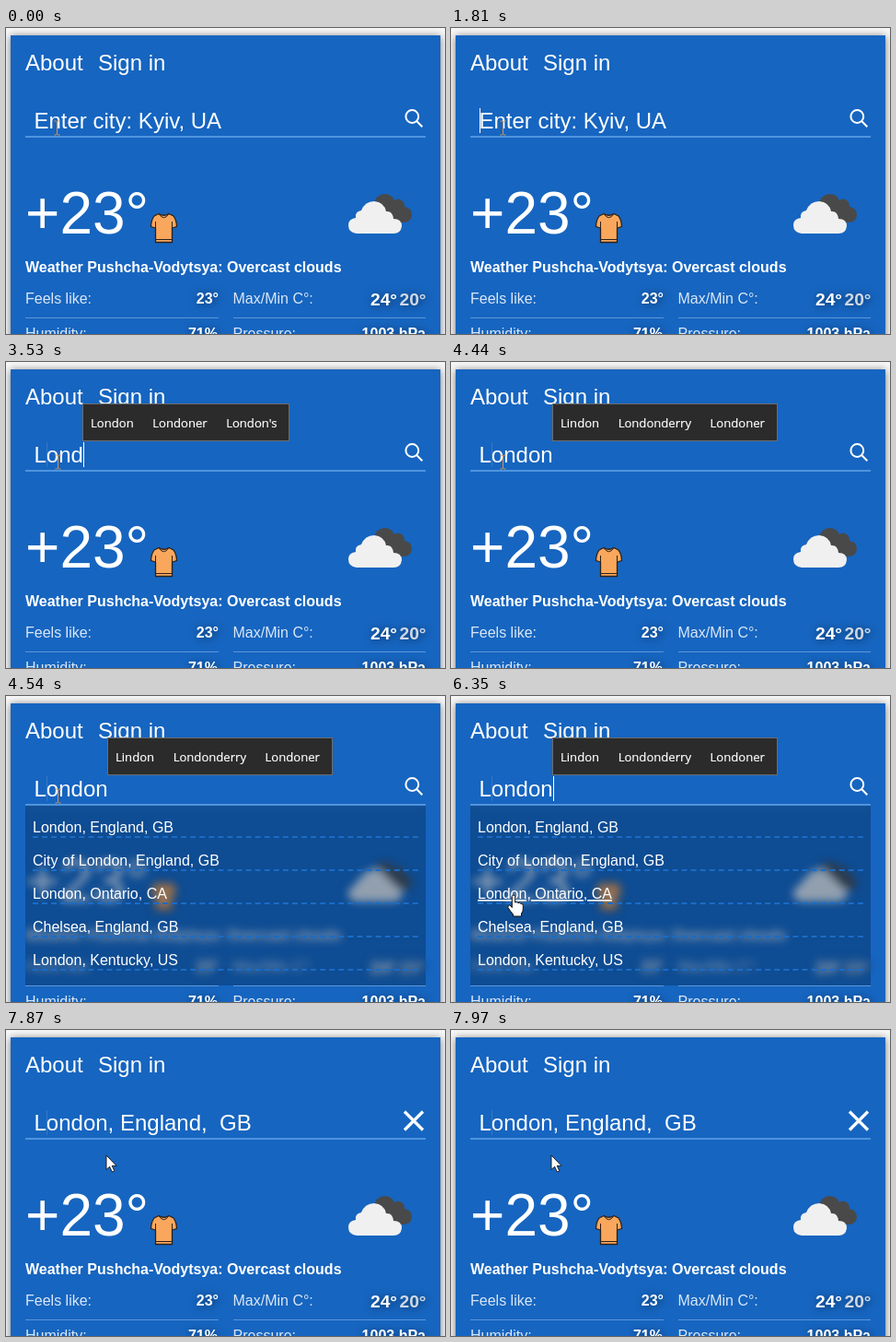
An HTML page for the animation above (8000 ms loop, 477 by 332 pixels).

```html
<!DOCTYPE html>
<html lang="en">
<head>
<meta charset="utf-8">
<title>Weather search</title>
<style>
  html, body { margin: 0; width: 100%; height: 100%; overflow: hidden; background: #f7f7f7; }
  svg { display: block; }
  text { font-family: "Liberation Sans", Arial, sans-serif; font-size: 16px; fill: #fff; white-space: pre; }
  .big { font-size: 24px; }
  .label { fill: #dbe7f5; }
  .value { font-weight: bold; text-anchor: end; filter: drop-shadow(1px 1px 4px rgba(0, 0, 0, .5)); }
  .range { font-size: 19.2px; }
  .popup text { font-family: "Open Sans", "Noto Sans", sans-serif; font-size: 13.1px; stroke: #fff; stroke-width: .2; }
  .hover { text-decoration: underline; }
</style>
</head>
<body>
<svg width="477" height="332" viewBox="0 0 477 332">
  <defs>
    <filter id="shadow" x="-5%" y="-5%" width="110%" height="110%">
      <feDropShadow dx="0" dy="1" stdDeviation="4" flood-color="#000" flood-opacity=".55"/>
    </filter>
    <filter id="blur"><feGaussianBlur stdDeviation="5"/></filter>
    <clipPath id="listArea"><rect x="21" y="119" width="435" height="195"/></clipPath>
  </defs>

  <rect x="5" y="8" width="467" height="360" fill="#1565c0" filter="url(#shadow)"/>
  <text class="big" x="21" y="46">About</text>
  <text class="big" x="100" y="46">Sign in</text>

  <g id="weather">
    <path d="M21 118 H456" stroke="#62a4e8" stroke-width="1.600"/>
    <text x="21" y="223" style="font-size:64px">+23°</text>
    <g stroke="#2c2018" stroke-width="1.300" stroke-linejoin="round" fill="#f9a75c">
      <path d="M166 201.500 L161 204 Q157.500 209 157.500 215.500 L162.500 217 V232.500 H180.500 V217 L185.500 215.500 Q185.500 209 182 204 L177 201.500 Q171.500 205 166 201.500Z"/>
      <path d="M166 201.500 Q171.500 210 177 201.500 M162.500 217 V210 M180.500 217 V210 M163 229.500 H180" fill="none" stroke-width="1"/>
    </g>
    <path fill="#494949" d="M400 209 V192 Q401 181 411 180 Q419 180 422 187 Q426 184 430 187 Q433 189 433 194 Q441 195 441 203 Q440 211 432 211 H402Z"/>
    <path fill="#f0f0f0" d="M381 223 Q372 222 372 214 Q372 207 380 206 Q379 199 386 198 Q390 188 400 188 Q411 189 413 199 Q420 198 421 207 Q430 207 430 215 Q429 223 421 223Z"/>
    <text x="21" y="265" font-weight="bold">Weather Pushcha-Vodytsya: Overcast clouds</text>
    <text class="label" x="21" y="299">Feels like:</text>
    <text class="value" x="231" y="299">23°</text>
    <text class="label" x="246.500" y="299">Max/Min C°:</text>
    <text class="value range" x="425" y="301">24°</text>
    <text class="value range" x="456.500" y="301" style="fill:#cfd8e4">20°</text>
  </g>

  <g id="list">
    <g clip-path="url(#listArea)">
      <rect x="21" y="119" width="435" height="195" fill="#1565c0"/>
      <use href="#weather" filter="url(#blur)"/>
      <rect x="21" y="119" width="435" height="195" fill="#04264e" fill-opacity=".4"/>
    </g>
  </g>

  <path d="M21 314.500 H231 M247 314.500 H456" stroke="#5c97d9"/>
  <text class="label" x="21" y="336.500">Humidity:</text>
  <text class="value" x="230" y="336.500">71%</text>
  <text class="label" x="246.500" y="336.500">Pressure:</text>
  <text class="value" x="456" y="336.500">1003 hPa</text>

  <text class="big" id="field" x="30.500" y="109"></text>
  <path id="trace" d="M44.500 87 V114" stroke="#4d86c8" stroke-opacity=".6"/>
  <path id="caret" d="M.5 87 V114" stroke="#fff"/>
  <g fill="none" stroke="#fff">
    <path id="lens" stroke-width="2" d="M448.200 96 a6.900 6.900 0 1 0 -13.800 0 a6.900 6.900 0 1 0 13.800 0 M446.200 101 L452.300 107.200"/>
    <path id="cross" stroke-width="3.200" d="M433 88.500 L453 108.500 M453 88.500 L433 108.500"/>
  </g>

  <g class="popup" id="popup">
    <rect x=".5" y="45.500" height="40" fill="#2b2b2b" stroke="#6c6c6c"/>
    <text x="9" y="71"></text>
  </g>

  <path id="beam" fill="none" stroke="#d09558" d="M-3 -7.500 H-1 L0 -6.500 L1 -7.500 H3 M0 -6.500 V6.500 M-3 7.500 H-1 L0 6.500 L1 7.500 H3"/>
  <path id="arrow" fill="#fff" stroke="#111" stroke-width=".9" d="M0 0 V15.500 L3.600 12.200 L6.300 18 L8.800 16.900 L6.200 11.300 H11Z"/>
  <path id="hand" fill="#fff" stroke="#111" stroke-linejoin="round" d="M-1.700 1.500 Q-1.500 0 0 0 Q1.500 0 1.700 1.500 V8 Q3.500 6.800 4.800 8.500 Q6.500 7.500 7.800 9.300 Q10.300 8.800 10.300 11.500 V15 Q10.300 18 8.500 20 V23 H-.5 V21 Q-4 17 -6 13.500 Q-6.500 11 -4.500 11 Q-3 11.300 -1.700 13.500Z"/>
</svg>

<script>
const LOOP = 8000;
const $ = id => document.getElementById(id);
const show = (el, on) => el.setAttribute("display", on ? "inline" : "none");
const move = (el, x, y) => el.setAttribute("transform", `translate(${x} ${y})`);

function add(parent, tag, attrs, text = "") {
  const el = document.createElementNS("http://www.w3.org/2000/svg", tag);
  for (const key in attrs) el.setAttribute(key, attrs[key]);
  el.textContent = text;
  return parent.appendChild(el);
}

// Value of the last [time, value] step already reached
const stepAt = (steps, t) => steps.reduce((value, [start, next]) => t >= start ? next : value, steps[0][1]);

const cities = ["London, England, GB", "City of London, England, GB", "London, Ontario, CA",
  "Chelsea, England, GB", "London, Kentucky, US"];
const rows = cities.map((city, i) => {
  const y = 148 + 36 * i;
  add($("list"), "path", { d: `M29 ${y + 5} H448`, stroke: "#1a6cc6", "stroke-width": 2, "stroke-dasharray": "6 4.07" });
  return add($("list"), "text", { x: 29, y }, city);
});

const typed = [[0, "Enter city: Kyiv, UA"], [2410, "L"], [2610, "Lo"], [2920, "Lon"], [3320, "Lond"],
  [3830, "Londo"], [4130, "London"], [7670, "London, England,  GB"]];
const hints = [[0, ""], [2710, "Looking|Looking for|Love"], [3020, "London|Longer|Longest"],
  [3420, "London|Londoner|London's"], [4130, "Lindon|Londonderry|Londoner"], [7670, ""]];
const hintX = [[0, 56], [3020, 70], [3420, 83], [3930, 97], [4130, 110]];
const caretX = [[0, 31], [2410, 44], [2610, 57], [2920, 70], [3320, 84], [3830, 97], [4130, 111]];
const caretOn = [[0, false], [800, true], [1300, false], [1810, true], [2310, false], [2410, true],
  [4440, false], [5050, true], [5550, false], [6050, true], [6550, false], [7060, true], [7570, false]];
const beamPos = [[0, [55.5, 108.5]], [690, [60.5, 111.5]], [800, [56.5, 108.5]]];

// Pointer positions, one every 100 ms
const pointerStart = 5750;
const pointerPath = [[57, 120], [57, 128], [58, 140], [60, 156], [63, 165], [66, 195], [68, 216], [68, 232],
  [68, 265], [69, 286], [71, 287], [76, 272], [88, 232], [99, 182], [108.5, 149], [109, 140], [109, 136]];

let shownHints = null;
function drawPopup(words, x) {
  const [box, label] = $("popup").children;
  show($("popup"), words);
  move($("popup"), x, 0);
  if (!words || words === shownHints) return;
  shownHints = words;
  label.textContent = "";
  words.split("|").forEach((word, i) => add(label, "tspan", { dx: i ? 20.5 : 0 }, word));
  box.setAttribute("width", Math.round(label.getBBox().width + 21.5));
}

function drawPointer(t, listOpen) {
  const pointing = t >= pointerStart;
  const index = Math.min(pointerPath.length - 1, Math.max(0, Math.floor((t - pointerStart) / 100)));
  const [x, y] = pointerPath[index];
  const row = Math.floor((y - 132) / 36);
  const over = pointing && listOpen && y - 132 - 36 * row < 20 ? row : -1;
  rows.forEach((el, i) => el.setAttribute("class", i === over ? "hover" : ""));
  show($("beam"), !pointing);
  show($("arrow"), pointing && over < 0);
  show($("hand"), over >= 0);
  move($("beam"), ...stepAt(beamPos, t));
  move($("arrow"), x, y);
  move($("hand"), x, y);
}

function render(t) {
  const listOpen = t >= 4540 && t < 7770;
  const done = t >= 7770;
  $("field").textContent = stepAt(typed, t);
  show($("list"), listOpen);
  show($("lens"), !done);
  show($("cross"), done);
  show($("trace"), t >= 2610);
  show($("caret"), stepAt(caretOn, t));
  move($("caret"), stepAt(caretX, t), 0);
  drawPopup(stepAt(hints, t), stepAt(hintX, t));
  drawPointer(t, listOpen);
}

const begin = performance.now();
function tick() {
  render((performance.now() - begin) % LOOP);
  requestAnimationFrame(tick);
}
tick();
</script>
</body>
</html>
```
